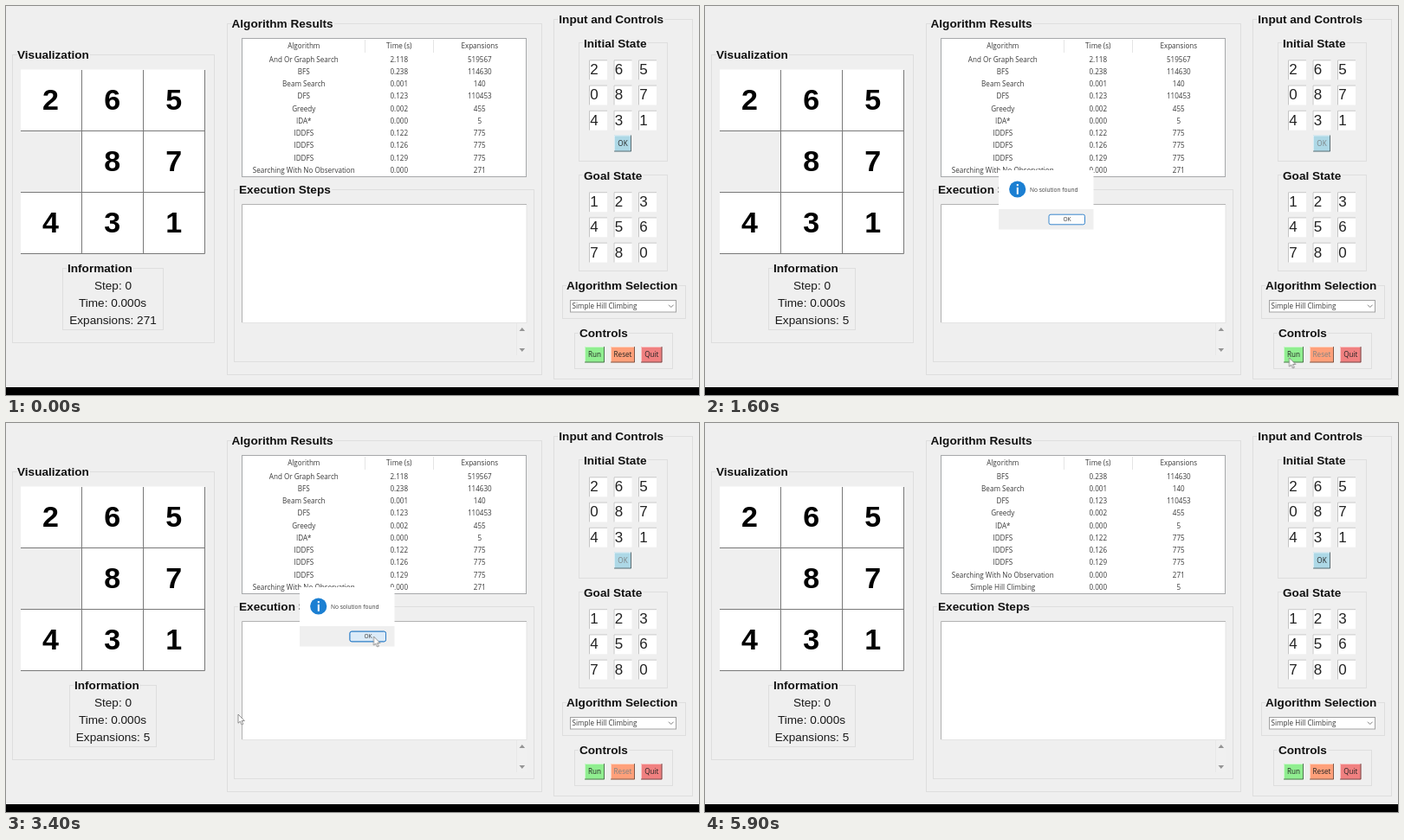
An HTML page that plays this animation: 800 px wide and 450 px high, repeating every 6000 ms.

```html
<!DOCTYPE html>
<html lang="en">
<head>
<meta charset="utf-8">
<title>Puzzle solver</title>
<style>
html, body { margin: 0; width: 100%; height: 100%; overflow: hidden; background: #efefef; }
svg { display: block; width: 800px; height: 450px; }
text { font: 8.1px "Open Sans", sans-serif; fill: #3a3a3a; }
.title { font: bold 13.6px "Liberation Sans", Arial, sans-serif; fill: #111;
  stroke: #efefef; stroke-width: 4px; paint-order: stroke; }
.tile { font: bold 34px "Liberation Sans", Arial, sans-serif; fill: #000; }
.digit { font: 17px "Liberation Sans", Arial, sans-serif; fill: #222; }
.info { font: 13.6px "Liberation Sans", Arial, sans-serif; fill: #1a1a1a; }
.small { font-size: 6.6px; }
.mid { text-anchor: middle; }

.idle, .ran, .listOld, .listNew, .busy, .ready, .picked, .hover, .ghost, .pointer {
  animation: 6s step-end infinite; }
.idle { animation-name: idle; }
.ran { animation-name: ran; }
.listOld { animation-name: listOld; }
.listNew { animation-name: listNew; }
.busy { animation-name: busy; }
.ready { animation-name: ready; }
.picked { animation-name: picked; }
.hover { animation-name: hover; }
.ghost { animation-name: ghost; }
.pointer { animation-name: pointer; }
.path { animation: path 6s linear infinite; }
@keyframes idle { 0% { opacity: 1 } 25%, 100% { opacity: 0 } }
@keyframes ran { 0% { opacity: 0 } 25%, 100% { opacity: 1 } }
@keyframes listOld { 0% { opacity: 1 } 60%, 100% { opacity: 0 } }
@keyframes listNew { 0% { opacity: 0 } 60%, 100% { opacity: 1 } }
@keyframes busy { 0% { opacity: 0 } 25% { opacity: 1 } 60%, 100% { opacity: 0 } }
@keyframes ready { 0% { opacity: 1 } 25% { opacity: 0 } 60%, 100% { opacity: 1 } }
@keyframes picked { 0% { opacity: 0 } 60% { opacity: 1 } 95%, 100% { opacity: 0 } }
@keyframes hover { 0% { opacity: 0 } 55% { opacity: 1 } 60%, 100% { opacity: 0 } }
@keyframes ghost { 0% { opacity: 0 } 50% { opacity: 1 } 60%, 100% { opacity: 0 } }
@keyframes pointer { 0% { opacity: 0 } 20% { opacity: 1 } 95%, 100% { opacity: 0 } }
@keyframes path {
  0%, 27% { transform: translate(674.5px, 407px) }
  32% { transform: translate(668px, 417px) }
  43.33%, 45% { transform: translate(361.5px, 318px) }
  50%, 51% { transform: translate(268px, 337px) }
  56%, 60% { transform: translate(424.5px, 247px) }
  68%, 100% { transform: translate(498px, 153px) }
}
</style>
</head>
<body>
<svg id="stage" viewBox="0 0 800 450"></svg>
<script>
const rect = (x, y, w, h, fill, more = '') =>
  `<rect x="${x}" y="${y}" width="${w}" height="${h}" fill="${fill}" ${more}/>`;
const line = (d, color, width = 1) =>
  `<path d="${d}" fill="none" stroke="${color}" stroke-width="${width}"/>`;
const text = (x, y, str, cls = '', more = '') =>
  `<text x="${x}" y="${y}" class="${cls}" ${more}>${str}</text>`;
const group = (cls, ...parts) => `<g class="${cls}">${parts.join('')}</g>`;

// Bordered panel with its title sitting on the top edge
const panel = (x, y, x2, y2, title, tx, ty) =>
  rect(x + .5, y + .5, x2 - x, y2 - y, 'none', 'stroke="#dedede"') + text(tx, ty, title, 'title');

function tiles() {
  let out = rect(17, 73.5, 212.5, 213, '#fff') + rect(17, 144.5, 70.5, 71, '#efefef');
  out += line('M87.5 74V286M158.5 74V286M17 144.5H229M17 215.5H229M229.5 74V286.5H17', '#787878');
  [...'265 87431'].forEach((n, i) => {
    if (n !== ' ') out += text(51.4 + i % 3 * 71.2, 119.8 + (i / 3 | 0) * 71, n, 'tile mid');
  });
  return out;
}

function entries(top, digits) {
  return [...digits].map((n, i) => {
    const x = 673 + i % 3 * 28.5, y = top + (i / 3 | 0) * 29.2;
    return rect(x, y, 21, 23, '#fff') +
      line(`M${x + .5} ${y + 23}V${y + .5}H${x + 21}`, '#c4c4c4') +
      text(x + 1.3, y + 16.9, n, 'digit');
  }).join('');
}

function button(x, y, w, h, color, label, locks) {
  const caption = (cls, fill) => text(x + w / 2, y + h / 2 + 3, label, 'mid ' + cls, `style="fill:${fill}"`);
  return rect(x, y, w, h, color) +
    line(`M${x + .5} ${y + h}V${y + .5}H${x + w}`, 'rgba(255,255,255,.55)') +
    line(`M${x} ${y + h - .5}H${x + w - .5}V${y}`, 'rgba(40,40,40,.6)') +
    (locks ? caption('ready', '#222') + caption('busy', '#7d8284') : caption('', '#222'));
}

function info(cls, x, x2, tx, count) {
  return group(cls, panel(x, 303, x2, 374, 'Information', tx, 308.3),
    text(123.5, 328.3, 'Step: 0', 'info mid'),
    text(123, 348.3, 'Time: 0.000s', 'info mid'),
    text(123.5, 368.3, 'Expansions: ' + count, 'info mid'));
}

const runs = [
  ['And Or Graph Search', '2.118', 519567], ['BFS', '0.238', 114630],
  ['Beam Search', '0.001', 140], ['DFS', '0.123', 110453], ['Greedy', '0.002', 455],
  ['IDA*', '0.000', 5], ['IDDFS', '0.122', 775], ['IDDFS', '0.126', 775],
  ['IDDFS', '0.129', 775], ['Searching With No Observation', '0.000', 271],
  ['Simple Hill Climbing', '0.000', 5]
];
const row = (cells, y) => cells.map((c, i) => text([343.8, 453.8, 546.8][i], y, c, 'mid')).join('');
const rows = (cls, list) => group(cls, ...list.map((r, i) => row(r, 64.8 + i * 14.22)));

const table = rect(272.5, 37.5, 328, 160, '#fff', 'stroke="#a6a8aa"') +
  line('M414.5 39V54M493.5 39V54', '#e5e5e5') +
  row(['Algorithm', 'Time (s)', 'Expansions'], 49.2) +
  rows('listOld', runs.slice(0, 10)) + rows('listNew', runs.slice(1));

const steps = rect(272, 229.5, 329, 137, '#fff') +
  line('M272.5 366.5V229.5H601', '#b2b2b2') + line('M272 366.5H601V230', '#e4e4e4') +
  rect(589.5, 367, 11.5, 37, '#f0f0f0') + line('M589.5 367V404', '#e8e8e8') +
  '<path d="M592.5 376l3.3-4 3.3 4zM592.5 396l3.3 4 3.3-4z" fill="#959595"/>';

const combo = rect(651.5, 340.5, 122, 13.5, '#fff', 'stroke="#a2a2a2"') +
  text(653.5, 350.2, 'Simple Hill Climbing') +
  group('picked', rect(652.5, 341.5, 108.5, 11.5, '#0f74d0'),
    line('M761.5 341V354', '#9cc4e6'), rect(651.5, 340.5, 122, 13.5, 'none', 'stroke="#5a9bd2"'),
    text(653.5, 350.2, 'Simple Hill Climbing', '', 'style="fill:#fff"')) +
  line('M765 345.7l2.8 2.8 2.8-2.8', '#707070', .9);

const okBox = (fill, edge) => rect(397, 241.2, 41.5, 11.6, fill, `rx="2" stroke="${edge}"`);
const dialog = group('busy',
  rect(339, 190, 109.5, 68.5, '#fff'), rect(339, 235, 109.5, 23.5, '#efefef'),
  '<circle cx="360.7" cy="212" r="9.6" fill="#1b7fd2"/>',
  rect(359.8, 206, 2, 2.2, '#fff'), rect(359.8, 209.8, 2, 8, '#fff'),
  text(375, 214.6, 'No solution found', 'small'),
  okBox('#fdfdfd', '#3a87cd'), group('hover', okBox('#dcebf8', '#2b7cc6')),
  text(418, 249.4, 'OK', 'small mid'));

const arrow = '<path d="M0 0V10.2L2.4 8.1L4.1 12L5.8 11.2L4.1 7.5H7.3Z" fill="#fff" stroke="#777" stroke-width=".8"/>';

document.getElementById('stage').innerHTML = [
  rect(0, 0, 800, 450, '#efefef'),
  rect(0, 441, 800, 9, '#000'),
  panel(7, 56, 240, 389, 'Visualization', 13, 61.2),
  tiles(),
  info('idle', 65, 181, 71, 271),
  info('ran', 73, 173, 79, 5),
  panel(255, 20, 618, 426, 'Algorithm Results', 260.5, 25.4),
  table,
  panel(263, 212, 609, 411, 'Execution Steps', 269, 217.3),
  steps,
  panel(632, 15, 792, 431, 'Input and Controls', 638.3, 19.8),
  panel(661, 42, 763, 179, 'Initial State', 667, 47.7),
  entries(62.3, '265087431'),
  button(702, 149.5, 20, 19, '#add8e6', 'OK', true),
  panel(661, 195, 763, 306, 'Goal State', 667, 200.6),
  entries(215.2, '123456780'),
  panel(642, 323, 784, 361, 'Algorithm Selection', 647, 328),
  combo,
  panel(656, 378, 769, 419, 'Controls', 662, 382.5),
  button(668, 394, 23, 18.5, '#90ee90', 'Run'),
  button(698, 394, 28, 18.5, '#ffa07a', 'Reset', true),
  button(733, 394, 24.5, 18.5, '#f08080', 'Quit'),
  dialog,
  group('ghost', `<g transform="translate(268 337)">${arrow}</g>`),
  group('pointer', group('path', arrow))
].join('');
</script>
</body>
</html>
```
